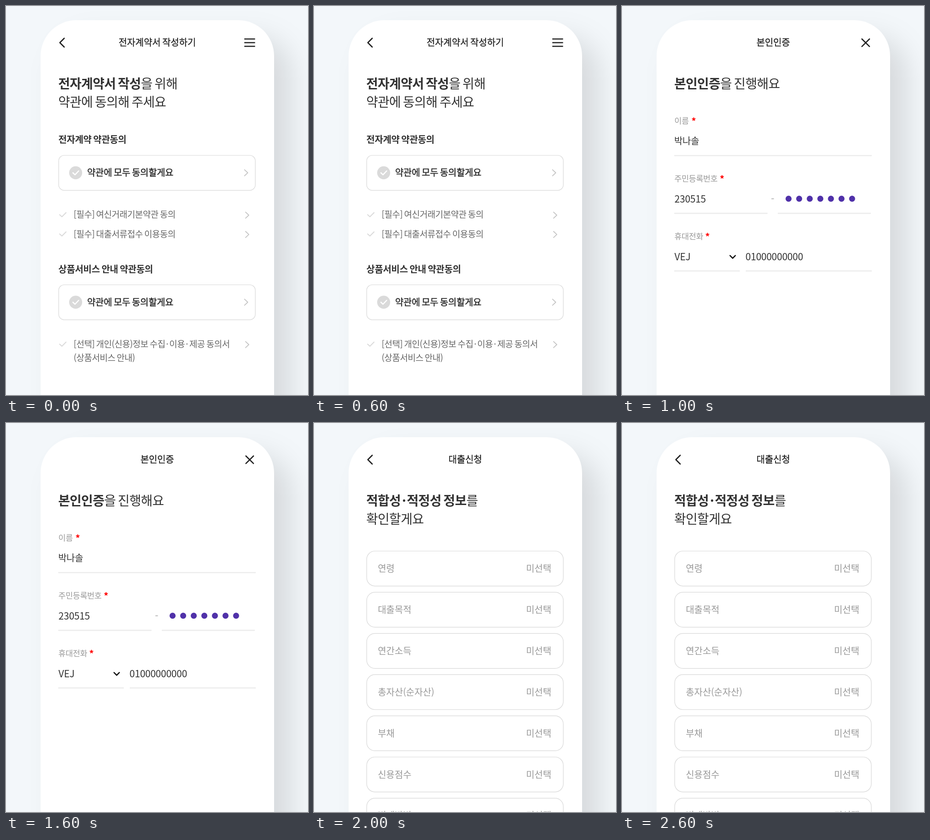
Write an HTML page that moves like this. It is 659 px wide and 849 px high and loops after 3000 ms.

```html
<!DOCTYPE html>
<html lang="ko">
<head>
<meta charset="utf-8">
<title>전자계약</title>
<style>
  html, body { margin: 0; width: 100%; height: 100%; overflow: hidden; background: #f3f7fa; }
  .stage { position: relative; width: 659px; height: 849px; overflow: hidden; contain: strict; }
  svg { display: block; width: 659px; height: 849px; overflow: hidden; }
  .phone { fill: #fff; }
  .shade { fill: #000; fill-opacity: .113; filter: blur(30px); }
  text {
    font: 400 20px "Noto Sans CJK KR", "Noto Sans CJK", "Noto Sans", sans-serif;
    letter-spacing: -.3px; word-spacing: -.085em; fill: #333; white-space: pre;
  }
  path, line { fill: none; stroke-linecap: round; stroke-linejoin: round; }

  .bar, .agree { fill: #222; stroke: #222; stroke-width: .35px; }
  .bar { text-anchor: middle; letter-spacing: -.1px; }
  .head { font-size: 28px; letter-spacing: -.7px; }
  .b, .sect { font-weight: 700; }
  .item { font-size: 19px; letter-spacing: -.5px; fill: #666; }
  .mid { text-anchor: middle; letter-spacing: 0; }
  .label { font-size: 17.5px; letter-spacing: -.4px; fill: #999; }
  .star { font-weight: 700; fill: #f00; }
  .num { font-size: 21px; letter-spacing: -.25px; }
  .row text { letter-spacing: -.1px; fill: #999; }
  .icon { stroke: #222; stroke-width: 2.6; }
  .go { stroke: #c4c4c4; stroke-width: 1.8; }
  .tick { stroke: #dadada; stroke-width: 2.1; }
  .box { fill: #fff; stroke: #d8d8d8; stroke-width: 1.2; }
  .rule { stroke: #ececec; stroke-width: 2.5; }
  .flat { stroke-linecap: butt; }

  .scene { animation: show 3s step-end infinite; }
  .s2 { animation-delay: -2s; }
  .s3 { animation-delay: -1s; }
  @keyframes show {
    0% { visibility: visible; }
    33.3333%, 100% { visibility: hidden; }
  }
</style>
</head>
<body>
<div class="stage">
<svg viewBox="0 0 659 849">
  <defs>
    <path id="back" class="icon" d="M127 70.5L117.5 80L127 89.5"/>
    <path id="go" class="go" d="M-3.5 -6.7L3.5 0L-3.5 6.7"/>
    <path id="tick" class="tick" d="M-7 0L-2 4.5L7 -4.5"/>
    <g id="all">
      <rect class="box" x="115" y="0" width="429" height="76.3" rx="12"/>
      <circle cx="152" cy="38" r="14.2" fill="#dadada"/>
      <path d="M146 38L150.5 42.3L158.5 34" stroke="#fff" stroke-width="2.5"/>
      <text class="agree" x="177" y="45">약관에 모두 동의할게요</text>
      <use href="#go" x="524" y="38"/>
    </g>
  </defs>

  <rect class="shade" x="112.5" y="68" width="509.5" height="1000" rx="78"/>
  <rect class="phone" x="75.5" y="31" width="509.5" height="1000" rx="78"/>

  <g class="scene">
    <use href="#back"/>
    <text class="bar" x="330" y="87.4">전자계약서 작성하기</text>
    <path class="icon flat" d="M520 72H543.5M520 80H543.5M520 88H543.5"/>
    <text class="head" x="114" y="180"><tspan class="b">전자계약서 작성</tspan>을 위해</text>
    <text class="head" x="114" y="220">약관에 동의해 주세요</text>

    <text class="sect" x="114.3" y="299.4">전자계약 약관동의</text>
    <use href="#all" y="326"/>
    <use href="#tick" x="124" y="455.5"/>
    <text class="item" x="147.6" y="462.4">[필수] 여신거래기본약관 동의</text>
    <use href="#go" x="526.3" y="456.5"/>
    <use href="#tick" x="124" y="497.5"/>
    <text class="item" x="147.6" y="504.7">[필수] 대출서류접수 이용동의</text>
    <use href="#go" x="526.3" y="498.7"/>

    <text class="sect" x="114.3" y="582">상품서비스 안내 약관동의</text>
    <use href="#all" y="608.5"/>
    <use href="#tick" x="124" y="738"/>
    <text class="item" x="147.6" y="745">[선택] 개인(신용)정보 수집</text>
    <text class="item mid" x="352" y="745">·</text>
    <text class="item" x="356.2" y="745">이용</text>
    <text class="item mid" x="395" y="745">·</text>
    <text class="item" x="400" y="745">제공 동의서</text>
    <text class="item" x="147.6" y="774.7">(상품서비스 안내)</text>
    <use href="#go" x="526.3" y="739"/>
  </g>

  <g class="scene s2">
    <text class="bar" x="330" y="87.4">본인인증</text>
    <path class="icon" d="M523.5 72L540 88.3M540 72L523.5 88.3"/>
    <text class="head" x="114" y="180"><tspan class="b">본인인증</tspan>을 진행해요</text>

    <text class="label" x="114.3" y="256.7">이름</text>
    <text class="star" x="151.5" y="259">*</text>
    <text x="114" y="301.6">박나솔</text>
    <path class="rule flat" d="M114 326.5H545"/>

    <text class="label" x="114.3" y="383">주민등록번호</text>
    <text class="star" x="213.3" y="385">*</text>
    <text class="num" x="114.6" y="428.5">230515</text>
    <path class="flat" d="M326 420.7H331.5" stroke="#bbb" stroke-width="2"/>
    <g id="dots" fill="#5031a9"></g>
    <path class="rule flat" d="M114 452.5H317.5M340 452.5H543"/>

    <text class="label" x="114.3" y="509">휴대전화</text>
    <text class="star" x="181.5" y="511">*</text>
    <text class="num" x="114.6" y="554.5">VEJ</text>
    <path d="M235.7 544.7L241.5 550.5L247.3 544.7" stroke="#111" stroke-width="2.5"/>
    <text class="num" x="269.6" y="554.5">01000000000</text>
    <path class="rule flat" d="M114 578.2H257M270 578.2H545"/>
  </g>

  <g class="scene s3">
    <use href="#back"/>
    <text class="bar" x="330" y="87.4">대출신청</text>
    <text class="head b" x="114" y="180">적합성</text>
    <text class="head b mid" x="196.5" y="180">·</text>
    <text class="head" x="202.4" y="180"><tspan class="b">적정성 정보</tspan>를</text>
    <text class="head" x="114" y="220">확인할게요</text>
    <g id="rows"></g>
  </g>
</svg>
</div>
<script>
  const fields = ['연령', '대출목적', '연간소득', '총자산(순자산)', '부채', '신용점수', '변제방법'];
  document.getElementById('rows').innerHTML = fields.map((name, i) => `
    <g class="row" transform="translate(0 ${279.5 + i * 89.9})">
      <rect class="box" x="115" y="0" width="429" height="76.3" rx="18"/>
      <text x="139.3" y="45.5">${name}</text>
      <text x="462.8" y="45.5">미선택</text>
    </g>`).join('');

  document.getElementById('dots').innerHTML = Array.from({ length: 7 }, (_, i) =>
    `<circle cx="${363.5 + i * 23.1}" cy="420.7" r="6.6"/>`).join('');
</script>
</body>
</html>
```
